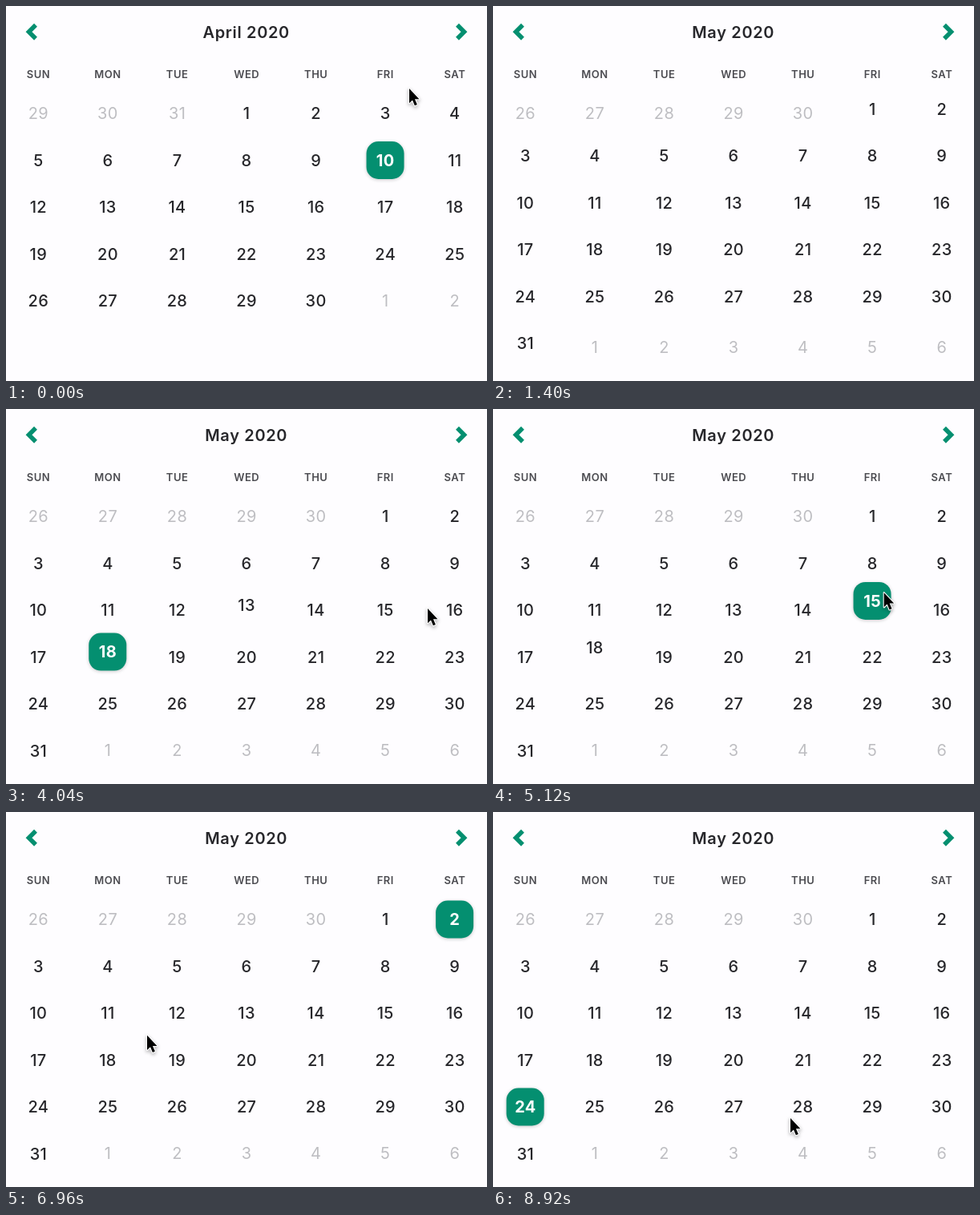
Write an HTML page with a canvas that moves like this. It is 600 px wide and 468 px high and loops after 9000 ms.

```html
<!DOCTYPE html>
<html lang="en">
<head>
<meta charset="utf-8">
<title>Calendar</title>
<style>
  html, body { margin: 0; width: 100%; height: 100%; overflow: hidden; background: #fefdff; }
  canvas { display: block; width: 600px; height: 468px; }
</style>
</head>
<body>
<canvas id="stage"></canvas>
<script>
const W = 600, H = 468, LOOP = 9000, STEP = 40;
const GREEN = '#048f70', INK = '#27272b', MUTED = '#bebec2', HEAD = '#4b4b50', PAPER = '#fefdff';
const FONT = 'Inter, "Liberation Sans", sans-serif';
const DROP = 41, DROP_MS = 400, PRESS_MS = 250, GLIDE_MS = 300;
const MONTH_AT = 920, MONTH_MS = 620;
const HIDE_AT = 1160, SHOW_AT = 1960;
const ARROW = { x: 570, y: 35 };

const april = { title: 'April 2020', first: 3, days: 30, before: 31, rows: 5 };
const may = { title: 'May 2020', first: 5, days: 31, before: 30, rows: 6 };

// Days tapped in May, release time, and where the pointer glides afterwards
const picks = [
  { day: 13, up: 2100, rest: { x: 266, y: 325 } },
  { day: 18, up: 3740, rest: { x: 526, y: 249 } },
  { day: 15, up: 4860 },
  { day: 2, up: 5980, rest: { x: 320, y: 366 } },
  { day: 11, up: 7420 },
  { day: 24, up: 7870, rest: { x: 371, y: 382 } }
];

const canvas = document.getElementById('stage');
const ctx = canvas.getContext('2d');
const ratio = window.devicePixelRatio || 1;
canvas.width = W * ratio;
canvas.height = H * ratio;

const clamp = v => Math.max(0, Math.min(1, v));
const ease = v => { v = clamp(v); return v * v * (3 - 2 * v); };

function cell(i) {
  return { x: 40.2 + 86.57 * (i % 7), y: 134 + 58.5 * Math.floor(i / 7) };
}

// Pointer stops follow from the taps: arrive, hold while pressing, glide off
const stops = [{ t: 80, x: 503, y: 103 }, { t: 480, ...ARROW }, { t: SHOW_AT - STEP, ...ARROW }];
for (const { day, up, rest } of picks) {
  const { x, y } = cell(day + may.first - 1);
  stops.push({ t: up - PRESS_MS / 2, x, y: y - 2 }, { t: up, x, y: y - 2 });
  if (rest) stops.push({ t: up + GLIDE_MS, ...rest });
}

function text(value, x, y, size, weight, color, spacing) {
  ctx.font = `${weight} ${size}px ${FONT}`;
  ctx.letterSpacing = spacing + 'px';
  ctx.fillStyle = color;
  ctx.fillText(value, x + spacing / 2, y + size * 0.364);
}

function drop(t, start, ms) {
  const age = t - start;
  return { dy: -DROP * (1 - ease(age / ms)), alpha: ease(age / (ms / 2)) };
}

// Touch feedback: fades to 20% on press, back after release
function pressAlpha(t, up) {
  return t < up ? 1 - 0.8 * ease((t - up + PRESS_MS) / 150) : 0.2 + 0.8 * ease((t - up) / 250);
}

function chevron(x, dir, alpha) {
  ctx.globalAlpha = alpha;
  ctx.strokeStyle = GREEN;
  ctx.lineWidth = 5.5;
  ctx.beginPath();
  ctx.moveTo(x - dir * 8.5, 23.7);
  ctx.lineTo(x, 32.2);
  ctx.lineTo(x - dir * 8.5, 40.7);
  ctx.stroke();
  ctx.globalAlpha = 1;
}

function badge(x, y) {
  ctx.save();
  ctx.shadowColor = 'rgba(0,0,0,0.22)';
  ctx.shadowBlur = 4 * ratio;
  ctx.shadowOffsetY = ratio;
  ctx.fillStyle = GREEN;
  ctx.beginPath();
  ctx.roundRect(x - 23.5, y - 23.5, 47, 47, 15);
  ctx.fill();
  ctx.restore();
}

function dayState(t, day) {
  if (t < MONTH_AT) return { dy: 0, alpha: 1, selected: day === 10 };
  let state = drop(t, MONTH_AT, MONTH_MS);
  let previous;
  for (const pick of picks) {
    const selected = pick.day === day;
    if (t >= pick.up && (selected || previous === day)) {
      state = { ...drop(t, pick.up, DROP_MS), selected };
    }
    if (selected) state.alpha *= pressAlpha(t, pick.up);
    previous = pick.day;
  }
  return state;
}

function drawDays(t, month) {
  for (let i = 0; i < month.rows * 7; i++) {
    const day = i - month.first + 1;
    const { x, y } = cell(i);
    if (day < 1 || day > month.days) {
      text(day < 1 ? month.before + day : day - month.days, x, y - 0.5, 20, 400, MUTED, 0.4);
      continue;
    }
    const { dy, alpha, selected } = dayState(t, day);
    ctx.globalAlpha = alpha;
    if (selected) badge(x, y + dy);
    text(day, x, y + dy, 20, selected ? 700 : 500, selected ? '#fff' : INK, 0.3);
    ctx.globalAlpha = 1;
  }
}

function pointer(t) {
  if (t >= HIDE_AT && t < SHOW_AT) return;
  const next = stops.findIndex(s => s.t > t);
  const b = stops.at(next), a = next > 0 ? stops[next - 1] : b;
  const k = a === b ? 0 : ease((t - a.t) / (b.t - a.t));
  ctx.save();
  ctx.translate(a.x + (b.x - a.x) * k, a.y + (b.y - a.y) * k);
  ctx.scale(0.93, 0.93);
  const arrow = new Path2D('M0 0V19.5L4.3 15.5L7.4 22.9L10.6 21.5L7.5 14.2H13.4Z');
  ctx.lineJoin = 'round';
  ctx.lineWidth = 2.3;
  ctx.strokeStyle = '#fff';
  ctx.shadowColor = 'rgba(0,0,0,0.35)';
  ctx.shadowBlur = 4 * ratio;
  ctx.shadowOffsetY = 2 * ratio;
  ctx.stroke(arrow);
  ctx.shadowColor = 'transparent';
  ctx.fillStyle = '#000';
  ctx.fill(arrow);
  ctx.restore();
}

function draw(t) {
  const month = t < MONTH_AT ? april : may;
  ctx.setTransform(ratio, 0, 0, ratio, 0, 0);
  ctx.fillStyle = PAPER;
  ctx.fillRect(0, 0, W, H);
  ctx.textAlign = 'center';
  chevron(28.5, -1, 1);
  chevron(571.5, 1, pressAlpha(t, MONTH_AT - STEP));
  text(month.title, 299.4, 32.5, 20, 600, INK, 0.65);
  ['SUN', 'MON', 'TUE', 'WED', 'THU', 'FRI', 'SAT'].forEach((name, c) =>
    text(name, cell(c).x, 85.5, 13, 600, HEAD, 0.5));
  drawDays(t, month);
  pointer(t);
}

function frame() {
  const t = performance.now() % LOOP;
  draw(Math.min(Math.floor(t / STEP) * STEP, LOOP - 2 * STEP));
  requestAnimationFrame(frame);
}
frame();
</script>
</body>
</html>
```
